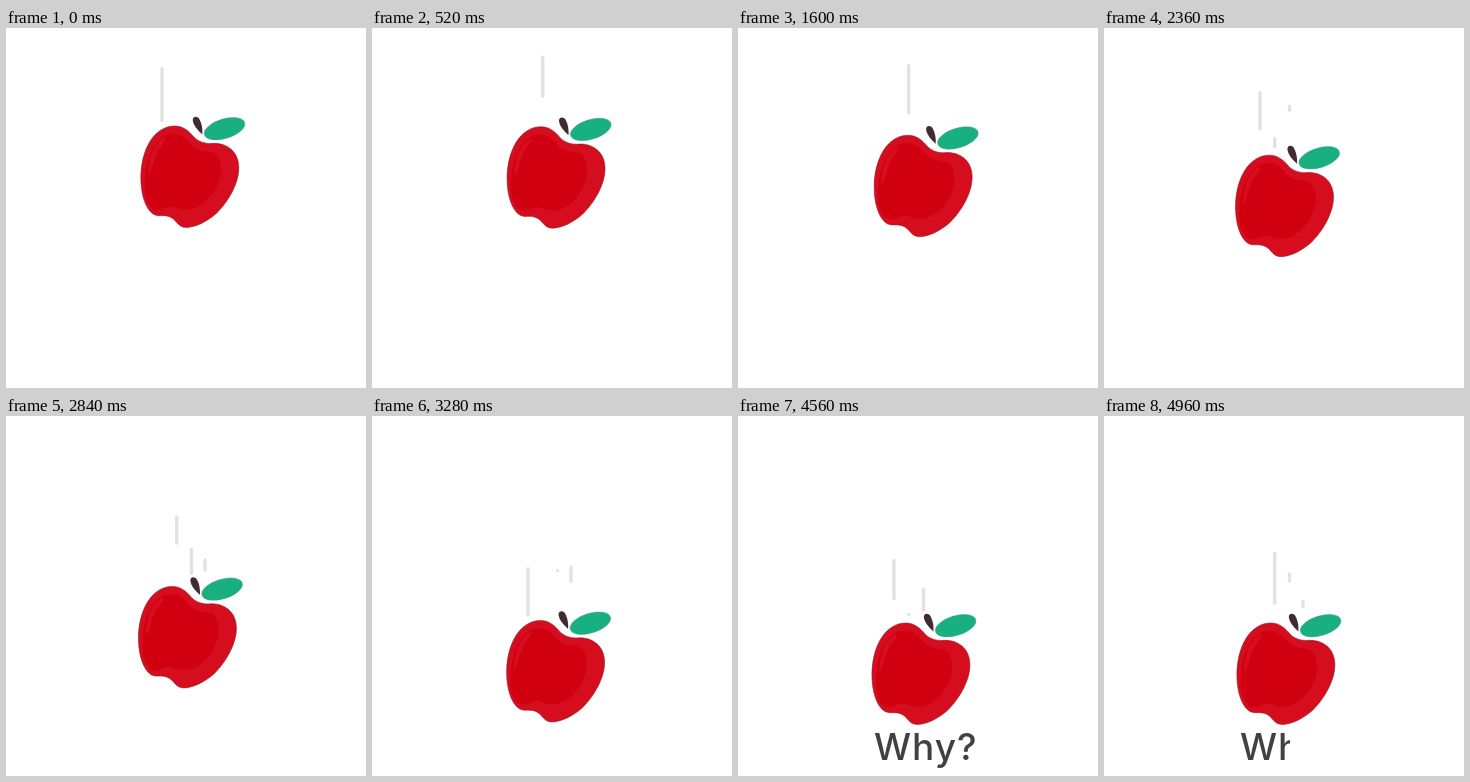
These frames come from a looping animation (360 px wide and 360 px high, 5 s). An HTML page:

```html
<!DOCTYPE html>
<html lang="en">
<head>
<meta charset="utf-8">
<title>Falling apple</title>
<style>
  html, body { margin: 0; width: 100%; height: 100%; overflow: hidden; background: #fff; }
  svg { display: block; width: 100vw; height: 100vh; }
  text { font: 500 37px Inter, sans-serif; letter-spacing: 1px; fill: #414141; }
</style>
</head>
<body>
<svg viewBox="0 0 360 360">
  <clipPath id="wipe"><rect id="window" y="300" height="60"/></clipPath>
  <g id="streaks" stroke="#e2e2e2" stroke-width="3.4" stroke-linecap="round"></g>
  <g id="apple">
    <path fill="#d50d1e" stroke="#8c2028" stroke-width=".6" d="M169 98C178 98 184 104 188 109C193 114 199 115.500 205 115.500C219 114 233 122 233 140C233 156 222 174 211 185C201 194 189 199.500 180 199.500C171 199 171 191 163 188.500C158 186.500 153 189 148 186.500C139 181 135 165 135 150C135 122 148 98 169 98Z"/>
    <path fill="#d00010" d="M164 106C175 104 181 111 186 117C192 123 199 123 205 124C213 125 216 135 215 146C213 160 203 173 192 179C184 183 176 182 169 179C162 176 155 185 147 181C140 175 138 162 139 150C141 126 150 109 164 106Z"/>
    <path fill="#d60e1f" d="M160 109C148 113 143 130 142 147C146 145 147 134 151 125C154 118 160 114 160 109Z"/>
    <path fill="#402c30" d="M187 93C186 88 192 87 194 92Q197 98 196.500 106.500Q188 99 187 93Z"/>
    <ellipse fill="#18b081" stroke="#4a9c80" stroke-width=".5" rx="21" ry="9.800" transform="translate(218.700 100.700) rotate(-17)"/>
  </g>
  <text x="136" y="343.500" clip-path="url(#wipe)">Why?</text>
</svg>
<script>
const LOOP = 5000, FALL_TIME = 3600, DROP = 109, STREAK_TIME = 700;
const WIPE_SPEED = .21, TEXT_LEFT = 130, TEXT_RIGHT = 245;
const byId = id => document.getElementById(id);
const clamp = (v, lo = 0, hi = 1) => Math.min(hi, Math.max(lo, v));

const lanes = [
  { x: 156, bottom: 94, length: 60, first: -320, every: 1105 },
  { x: 170.7, bottom: 91, length: 64, first: 50, every: 1125 },
  { x: 185.5, bottom: 86.5, length: 39, first: 850, every: 875 },
  { x: 199, bottom: 83, length: 40, first: 1650, every: 1080 }
];
for (const lane of lanes) {
  lane.line = document.createElementNS('http://www.w3.org/2000/svg', 'line');
  lane.line.setAttribute('x1', lane.x);
  lane.line.setAttribute('x2', lane.x);
  byId('streaks').append(lane.line);
}

// cubic Bezier easing, slow start and firm landing
function ease(u) {
  let lo = 0, hi = 1;
  for (let i = 0; i < 20; i++) {
    const s = (lo + hi) / 2, r = 1 - s;
    const x = 3 * 1.08 * s * r * r + 3 * .6 * s * s * r + s ** 3;
    if (x < u) lo = s; else hi = s;
  }
  return lo * lo * (3 - 2 * lo);
}

// sideways tremble that calms down over the loop
function sway(t) {
  const u = t / LOOP;
  return -2 + 1.7 * u + (3.2 - 1.4 * u) * Math.sin(t / 82 + .6);
}

// a streak grows upward, then its lower end follows
function drawStreak({ line, bottom, length, first, every }, t, dy) {
  const p = t < first ? 0 : (t - first) % every / STREAK_TIME * 2;
  const low = bottom + dy - length * clamp(p - 1) - 1.5;
  const high = bottom + dy - length * clamp(p) + 1.5;
  line.setAttribute('y1', low);
  line.setAttribute('y2', Math.min(high, low));
  line.style.display = p > 0 && p < 2 ? '' : 'none';
}

function wipeEdge(t, start) {
  return clamp(TEXT_RIGHT - (t - start) * WIPE_SPEED, TEXT_LEFT, TEXT_RIGHT);
}

function draw(t) {
  const dy = DROP * ease(clamp(t / FALL_TIME));
  byId('apple').setAttribute('transform', `translate(${sway(t)} ${dy})`);
  for (const lane of lanes) drawStreak(lane, t, dy);

  // the word is wiped in and out from right to left
  const left = wipeEdge(t, 3705), right = wipeEdge(t, 4680);
  byId('window').setAttribute('x', left);
  byId('window').setAttribute('width', right - left);
}

const begin = performance.now();
function tick() {
  draw((performance.now() - begin) % LOOP);
  requestAnimationFrame(tick);
}
tick();
</script>
</body>
</html>
```
